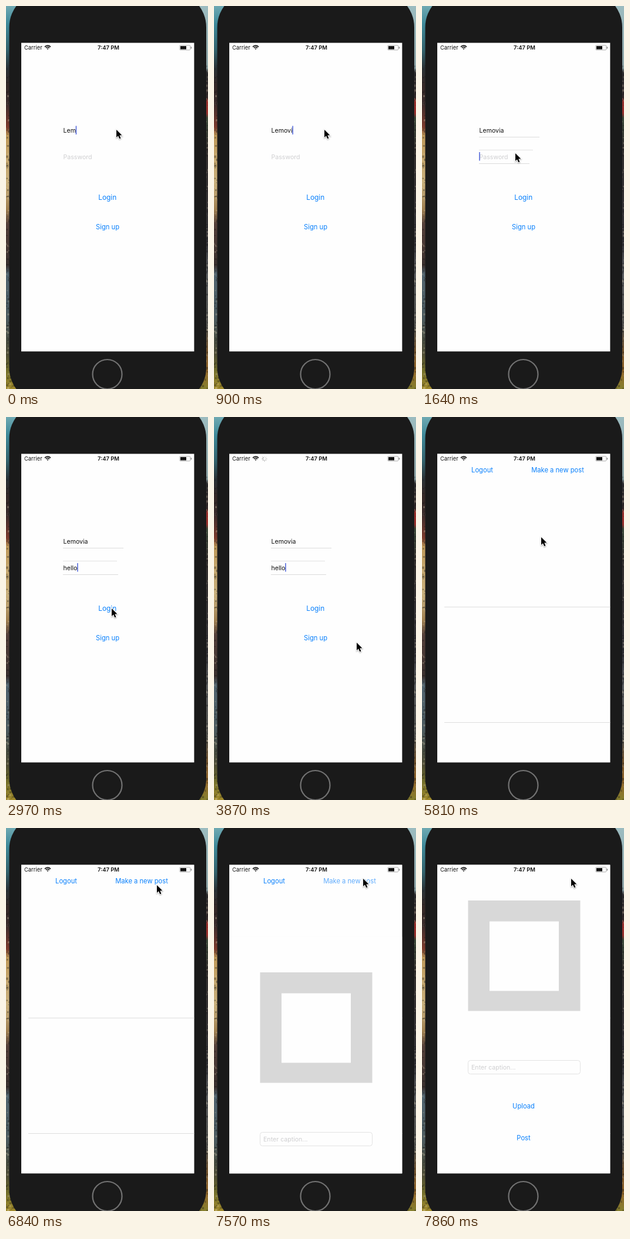
An HTML page with a canvas that plays this animation: 344x650 px, repeating every 8 s.

```html
<!DOCTYPE html>
<html lang="en">
<head>
<meta charset="utf-8">
<title>Login and new post</title>
<style>
  html, body { margin: 0; width: 100%; height: 100%; overflow: hidden; background: #1a1a1a; }
  canvas { display: block; }
</style>
</head>
<body>
<canvas id="stage" width="344" height="650"></canvas>
<script>
const c = document.getElementById('stage').getContext('2d');
const LOOP = 8000, BLUE = '#0a80fc', HINT = '#cfcfd1';
const LEFT = 26, TOP = 62.4, WIDTH = 294.4, HEIGHT = 523.8;
const USER = 'Lemovia', PASS = 'hello';

const ticks = [0, 300];
for (const [a, b, n] of [[750, 1640, 7], [2090, 2680, 5], [2970, 3870, 7], [4020, 5060, 8],
                         [5210, 5810, 2], [6100, 6840, 6], [7140, 7860, 6]])
  for (let i = 0; i < n; i++) ticks.push(Math.round((a + (b - a) * i / (n - 1)) / 10) * 10);

// Pointer path: [time, x, y]
const path = [[0, 187, 209], [1050, 187, 209], [1490, 170, 254], [1640, 158, 249], [2680, 158, 249],
  [2970, 179, 324], [3270, 179, 324], [3870, 242, 382], [4170, 255, 440], [4470, 284, 583],
  [5060, 265, 644], [5810, 202, 203], [6100, 215, 193], [6550, 267, 130], [6840, 256, 96],
  [7140, 253, 85], [8000, 253, 85]];

function pointerAt(t) {
  const i = path.findIndex(p => p[0] > t), [t0, x0, y0] = path[i - 1], [t1, x1, y1] = path[i];
  const k = (t - t0) / (t1 - t0);
  return [Math.round(x0 + (x1 - x0) * k), Math.round(y0 + (y1 - y0) * k)];
}

// Remaining distance of a sheet sliding up, critically damped
function slide(ms) {
  if (ms < 0) return HEIGHT;
  if (ms > 400) return 0;
  const k = 0.0173 * ms;
  return Math.round(HEIGHT * (1 + k) * Math.exp(-k));
}

// Opacity of a button pressed at `down` and released at `up`
const press = (t, down, up) =>
  t < down ? 1 : t < up ? 0.2 : Math.min(1, 0.2 + 0.8 * (t - up) / 350);

function rect(x, y, w, h, color) {
  c.fillStyle = color;
  c.fillRect(x, y, w, h);
}

function text(s, x, y, size, color, align = 'left', weight = 400) {
  c.font = `${weight} ${size}px Inter, "Liberation Sans", sans-serif`;
  c.textAlign = align;
  c.fillStyle = color;
  c.fillText(s, x, y);
  return c.measureText(s).width;
}

function button(s, x, y, size = 11.2, alpha = 1) {
  c.globalAlpha = alpha;
  text(s, x, y, size, BLUE, 'center');
  c.globalAlpha = 1;
}

function strip(x, w, stops) {
  const g = c.createLinearGradient(0, 0, 0, 650);
  for (const [y, color] of stops) g.addColorStop(y / 650, color);
  rect(x, 0, w, 650, g);
}

// Blurred street photo: two colour strips, mottled below the sky
function wallpaper() {
  strip(0, 172, [[0, '#6fa9b2'], [30, '#3f8a9a'], [75, '#33626c'], [105, '#2a3236'], [135, '#352826'],
    [165, '#3a2c2c'], [205, '#7c3a2c'], [220, '#c09a5a'], [300, '#c9b07c'], [345, '#a08050'],
    [370, '#54403a'], [440, '#3a302e'], [455, '#526570'], [530, '#4c5a5e'], [590, '#4c4a34'],
    [620, '#75702a'], [650, '#a08a2c']]);
  strip(172, 172, [[0, '#9cbcc0'], [105, '#8ea4a6'], [112, '#2c2c2e'], [155, '#332a2a'], [162, '#98302c'],
    [182, '#98302c'], [190, '#3d4a3a'], [240, '#34302e'], [400, '#333236'], [450, '#5c5e60'],
    [545, '#545450'], [590, '#7a562a'], [620, '#94682a'], [650, '#857f2e']]);
  let seed = 7;
  const rnd = () => (seed = seed * 16807 % 2147483647) / 2147483647;
  for (let i = 0; i < 900; i++) {
    const y = 100 + rnd() * 550, x = rnd() < 0.5 ? rnd() * 20 : 324 + rnd() * 20;
    rect(x, y, 1 + rnd() * 3, 1 + rnd() * 3, rnd() < 0.6 ? 'rgba(20,20,20,.35)' : 'rgba(225,210,180,.25)');
  }
}

function phone() {
  c.beginPath();
  c.roundRect(5.5, -24, 335.5, 698, 60);
  c.fillStyle = '#1a1a1a';
  c.fill();
  c.beginPath();
  c.arc(172.5, 625, 25, 0, 7);
  c.strokeStyle = '#727272';
  c.lineWidth = 2.2;
  c.stroke();
}

function statusBar(t) {
  text('Carrier', 31, 74, 9.4, '#111');
  text('7:47 PM', 174.5, 74, 9.4, '#111', 'center', 600);
  c.strokeStyle = '#111';
  c.lineWidth = 1.7;
  for (const r of [6.8, 4.1, 1.2]) {
    c.beginPath();
    c.arc(71, 74, r, -Math.PI * 0.76, -Math.PI * 0.24);
    c.stroke();
  }
  c.beginPath();
  c.roundRect(295.8, 66.7, 18, 8, 1.5);
  c.strokeStyle = '#999';
  c.lineWidth = 0.8;
  c.stroke();
  rect(297, 68, 10, 5.5, '#111');
  rect(314.8, 69.3, 1.2, 3, '#777');
  if (t >= 3270 && t < 4400) spinner(t);
}

function spinner(t) {
  c.lineWidth = 1;
  for (let i = 0; i < 8; i++) {
    const a = (i + Math.floor(t / 100)) * Math.PI / 4, x = Math.cos(a), y = Math.sin(a);
    c.strokeStyle = `rgba(90,90,90,${0.2 + i * 0.1})`;
    c.beginPath();
    c.moveTo(86 + x * 2, 71 + y * 2);
    c.lineTo(86 + x * 4.5, 71 + y * 4.5);
    c.stroke();
  }
}

function loginPage(t) {
  const n = t < 300 ? 3 : t < 750 ? 4 : Math.min(7, 5 + Math.round((t - 750) / 150));
  const m = Math.max(0, Math.min(5, Math.round((t - 1942) / 148)));
  const inPass = t >= 1640;
  if (t >= 1200) {
    rect(97, 222, 103, 1, '#dcdcdc');
    rect(97, 244, 92, 1, '#e2e2e2');
    rect(97, 267, t < 2970 ? 86 : 94, 1, '#dcdcdc');
  } else rect(186, 222, 14, 1, '#e4e4e4');
  const w1 = text(USER.slice(0, n), 97.5, 214.5, 10.6, '#111');
  const w2 = m ? text(PASS.slice(0, m), 97.5, 259.5, 10.6, '#111') : 0;
  if (!m) text('Password', 97.5, 259.5, 10.6, HINT);
  rect(97.3 + (inPass ? w2 : w1), inPass ? 248 : 203.5, 1.4, 14.5, '#4058d8');
  button('Login', 172.7, 328.5, 11.9, press(t, 3120, 3200));
  button('Sign up', 173, 379);
}

function sheet(offset, draw) {
  if (offset >= HEIGHT) return;
  c.save();
  c.translate(0, offset);
  rect(LEFT, TOP, WIDTH, HEIGHT, '#fefefe');
  draw();
  c.restore();
}

function feedPage(t) {
  button('Logout', 102.5, 94);
  button('Make a new post', 231, 94, 11.2, press(t, 7290, 7373));
  rect(38, 322, 283, 1, '#dedede');
  rect(38, 518, 283, 1, '#dedede');
}

function postPage() {
  rect(78.5, 123, 191, 187.5, '#d8d8d8');
  rect(115, 158.5, 118, 118, '#fefefe');
  c.beginPath();
  c.roundRect(78.5, 394.5, 191, 23, 4);
  c.strokeStyle = '#e3e3e3';
  c.lineWidth = 1;
  c.stroke();
  text('Enter caption...', 84, 409.5, 10.6, HINT);
  button('Upload', 173, 475.5);
  button('Post', 173, 529.5);
}

function pointer(x, y) {
  c.save();
  c.translate(x + 1, y + 1);
  c.scale(0.9, 0.9);
  c.beginPath();
  for (const [px, py] of [[0, 0], [0, 14.5], [3.3, 11.5], [5.8, 17], [8.3, 16], [5.9, 10.5], [10.4, 10.3]])
    c.lineTo(px, py);
  c.closePath();
  c.shadowColor = 'rgba(0,0,0,.35)';
  c.shadowBlur = 2;
  c.shadowOffsetY = 1;
  c.strokeStyle = '#fff';
  c.lineWidth = 2;
  c.stroke();
  c.shadowColor = 'transparent';
  c.fillStyle = '#000';
  c.fill();
  c.restore();
}

function draw(t) {
  wallpaper();
  phone();
  c.save();
  c.beginPath();
  c.rect(LEFT, TOP, WIDTH, HEIGHT);
  c.clip();
  c.fillStyle = '#fefefe';
  c.fillRect(0, 0, 344, 650);
  loginPage(t);
  sheet(slide(t - 4158), () => feedPage(t));
  sheet(slide(t - 7409), postPage);
  statusBar(t);
  c.restore();
  if (t < 5210 || t >= 5810) pointer(...pointerAt(t));
}

function frame(now) {
  const t = now % LOOP;
  draw(ticks.findLast(k => k <= t));
  requestAnimationFrame(frame);
}
draw(0);
requestAnimationFrame(frame);
</script>
</body>
</html>
```
